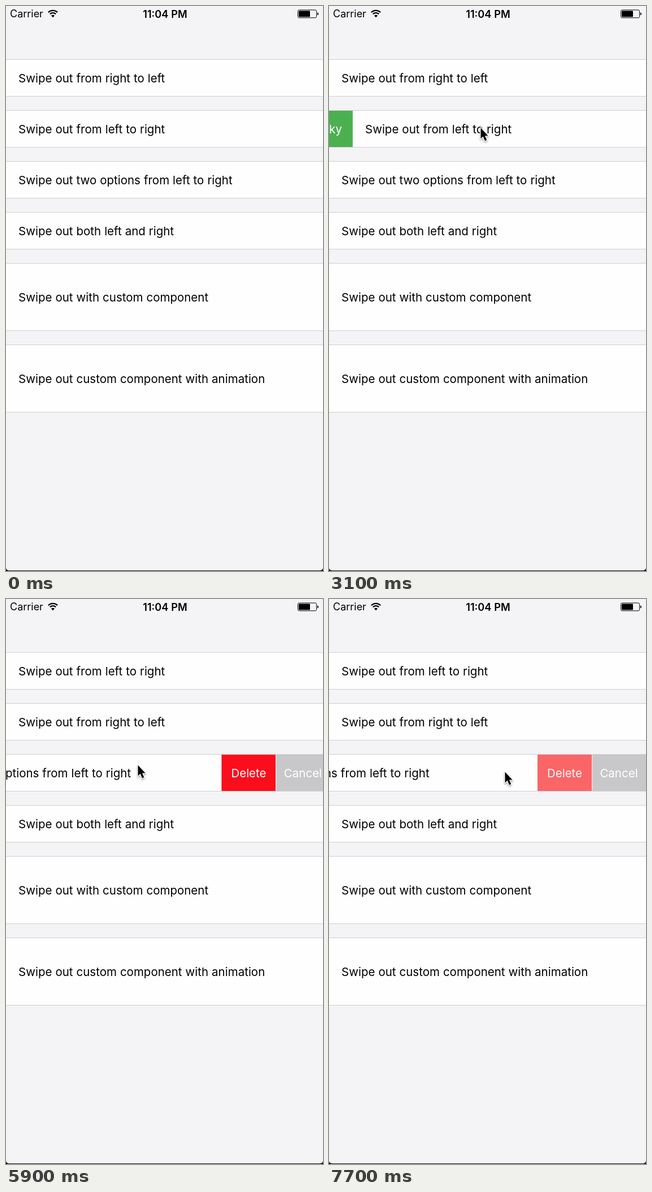
Animation, 561 px wide and 998 px high, one loop 8000 ms. Source, as an HTML page:

```html
<!DOCTYPE html>
<html lang="en">
<head>
<meta charset="utf-8">
<title>Swipe out rows</title>
<style>
  html, body { margin: 0; width: 100%; height: 100%; overflow: hidden; background: #111; }
  body { font: 20.5px Inter, Roboto, sans-serif; word-spacing: .22px; color: #000; }
  .screen {
    position: absolute; left: 0; top: 0; width: 561px; height: 997px;
    overflow: hidden; background: #f4f3f6; border-radius: 0 0 5px 5px;
  }
  .status { position: absolute; top: 0; line-height: 28px; font-size: 18px; white-space: nowrap; }
  .carrier { left: 7px; }
  .clock { left: 0; width: 563px; text-align: center; font-size: 18.2px; font-weight: 600; }
  svg { position: absolute; left: 0; top: 0; overflow: visible; }
  .row {
    position: absolute; left: 0; width: 561px; height: 66px; box-sizing: border-box;
    line-height: 65px; overflow: hidden; white-space: nowrap;
    background: #fffeff; border: solid #cecdd1; border-width: 1px 0;
  }
  .row.tall { height: 120px; line-height: 119px; }
  .label { position: absolute; left: 22px; top: 0; }
  .buttons { position: absolute; top: 0; display: flex; height: 100%; }
  .buttons.right { left: 561px; }
  .buttons.left { right: 561px; }
  .button { width: 96px; text-align: center; color: #fff; }
  .cancel { background: #c8c7ca; }
  .button + .cancel { box-shadow: inset 1px 0 #f0eff1; }
  .delete { background: #fb0d1b; }
  .delete.pressed { background: #fa6567; }
  .lucky { background: #4cb050; }
  .lucky.pressed { background: #91cf93; }
  #cursor { filter: drop-shadow(0 2px 1.5px rgba(0, 0, 0, .35)); }
</style>
</head>
<body>
<div class="screen">
  <div class="status carrier">Carrier</div>
  <div class="status clock">11:04 PM</div>
  <svg width="561" height="28">
    <g fill="none" stroke="#000" stroke-width="2.3">
      <path d="M74.9 11.2a11.5 11.5 0 0 1 16.2 0"/>
      <path d="M77.8 14.3a7.4 7.4 0 0 1 10.4 0"/>
    </g>
    <path d="M83 20.2l-3-3.1a4.2 4.2 0 0 1 6 0z"/>
    <rect x="516.5" y="7" width="33" height="13.8" rx="2.3" fill="none" stroke="#000"/>
    <rect x="518" y="8.6" width="20" height="10.6" rx="1"/>
    <path d="M551 11.3q2 .7 2 2.6t-2 2.6z"/>
  </svg>

  <div class="row" id="first" style="top:94px">
    <div class="label">Swipe out from right to left</div>
    <div class="buttons right"><div class="button cancel">Cancel</div></div>
  </div>
  <div class="row" id="second" style="top:184px">
    <div class="label">Swipe out from left to right</div>
    <div class="buttons left"><div class="button lucky">Lucky</div></div>
  </div>
  <div class="row" id="third" style="top:274px">
    <div class="label">Swipe out two options from left to right</div>
    <div class="buttons right">
      <div class="button delete">Delete</div>
      <div class="button cancel">Cancel</div>
    </div>
  </div>
  <div class="row" style="top:364px"><div class="label">Swipe out both left and right</div></div>
  <div class="row tall" style="top:454px"><div class="label">Swipe out with custom component</div></div>
  <div class="row tall" style="top:598px"><div class="label">Swipe out custom component with animation</div></div>

  <svg id="cursor" width="20" height="30">
    <path d="M.5 .5V19.5L4.7 15.6 8 23.4 11.3 22 8 14.4H13.6Z"
      stroke="#fff" stroke-width="2.6" stroke-linejoin="round" paint-order="stroke"/>
  </svg>
</div>

<script>
const LOOP = 8000, STEP = 100, BUTTON = 96, SETTLE = 300, POINT = 1.496;
const ENTER = 400, TAP_LUCKY = 4000, TAP_DELETE = 6600;

const $ = selector => document.querySelector(selector);
const move = (el, x, y = 0) => { el.style.transform = `translate(${x}px, ${y}px)`; };
const clamp = (v, min, max) => Math.max(min, Math.min(max, v));
const mix = (a, b, k) => a + (b - a) * k;
const progress = (t, start, end) => clamp((t - start) / (end - start), 0, 1);
const smooth = k => k * k * (3 - 2 * k);
const easeOut = (k, power) => 1 - (1 - k) ** power;

const glide = (start, end, x, y) => ({ start, end, x, y });
const cursorStart = { x: 561, y: 140 };
const glides = [
  glide(300, 600, 432, 127),
  glide(900, 1200, 297, 132),   // drag the first row open
  glide(2100, 2400, 393, 134),  // and shut
  glide(2400, 2800, 226, 212),
  glide(3000, 3320, 407, 224),  // drag the second row open
  glide(3400, 3900, 48, 224),   // to its button
  glide(4200, 4900, 391, 290),
  glide(4900, 5100, 397, 294),
  glide(5300, 5800, 233, 293),  // drag the third row open
  glide(5900, 6300, 412, 298),  // to its button
  glide(6500, 7000, 511, 302),  // drag it back and forth
  glide(7000, 7700, 311, 305)
];

function cursorAt(t) {
  return glides.reduce((from, to) => {
    const k = smooth(progress(t, to.start, to.end));
    return { x: mix(from.x, to.x, k), y: mix(from.y, to.y, k) };
  }, cursorStart);
}

// While held, a row follows the cursor; once released it settles at rest.
const hold = (start, release, rest) => ({ start, release, rest });
const holds = {
  first: [hold(900, 1450, -BUTTON), hold(2100, 2400, 0)],
  second: [hold(3000, 3350, BUTTON), hold(TAP_LUCKY, TAP_LUCKY, 0)],
  third: [hold(5300, 5800, -2 * BUTTON), hold(6500, LOOP, 0)]
};

function dragAt(rowHolds, t) {
  return rowHolds.reduce((offset, { start, release, rest }) => {
    if (t < start) return offset;
    const dragged = offset + cursorAt(Math.min(t, release)).x - cursorAt(start).x;
    return mix(dragged, rest, easeOut(progress(t, release, release + SETTLE), 2));
  }, 0);
}

// Past the width of its buttons a row resists the drag.
function rubberBand(drag, limit) {
  const over = Math.abs(drag) - limit;
  return over > 0 ? Math.sign(drag) * (limit + POINT * (over / POINT) ** .72) : drag;
}

const rows = Object.keys(holds).map(id => {
  const row = $('#' + id), buttons = row.querySelector('.buttons');
  return { id, row, buttons, label: row.querySelector('.label'), limit: buttons.children.length * BUTTON };
});
const cursor = $('#cursor'), lucky = $('.lucky'), deleteButton = $('.delete');

function draw(now) {
  const t = Math.floor(now % LOOP / STEP) * STEP;

  for (const { id, label, buttons, limit } of rows) {
    const drag = dragAt(holds[id], t);
    move(label, rubberBand(drag, limit));
    move(buttons, clamp(drag, -limit, limit));
  }

  // The first two rows trade places.
  const swap = 90 * easeOut(progress(t, TAP_LUCKY, TAP_LUCKY + 770), 3);
  move(rows[0].row, 0, swap);
  move(rows[1].row, 0, -swap);

  lucky.classList.toggle('pressed', t >= TAP_LUCKY);
  deleteButton.classList.toggle('pressed', t >= TAP_DELETE);

  const { x, y } = cursorAt(t);
  cursor.style.visibility = t < ENTER ? 'hidden' : 'visible';
  move(cursor, x, y);
}

const start = performance.now();
function tick() {
  draw(performance.now() - start);
  requestAnimationFrame(tick);
}
tick();
</script>
</body>
</html>
```
